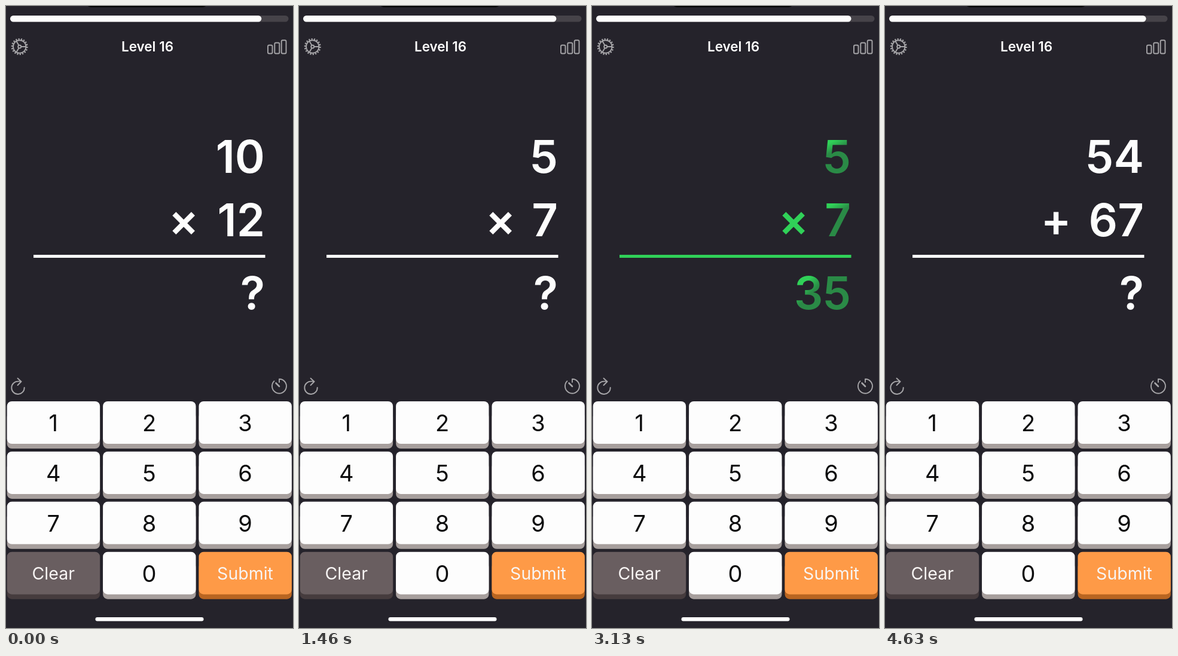
An HTML page that plays this animation: 480 by 1040 pixels, repeating every 5290 ms.

```html
<!DOCTYPE html>
<html lang="en">
<head>
<meta charset="utf-8">
<title>Arithmetic drill</title>
<style>
html, body { margin: 0; width: 100%; height: 100%; overflow: hidden; background: #25232b; }
svg { display: block; width: 480px; height: 1040px; font-family: Inter, Roboto, sans-serif; }
.icon { fill: none; stroke: #a6a5a8; stroke-width: 1.9; stroke-linecap: round; stroke-linejoin: round; }
.title { font-size: 22.5px; font-weight: 600; fill: #fdfdfd; text-anchor: middle; }
.num, .op { font-size: 76px; font-weight: 600; font-feature-settings: "calt" 0; }
.num { text-anchor: end; }
.op { text-anchor: middle; }
.key text { font-size: 38px; text-anchor: middle; fill: #0b0b0c; }
.key .word { font-size: 28.5px; fill: #f8f5f4; }
</style>
</head>
<body>
<svg viewBox="0 0 480 1040">
  <defs id="defs"></defs>
  <rect width="480" height="1040" fill="#25232b"/>
  <path d="M137 0H334Q332 2 326 2H145Q139 2 137 0Z" fill="#000"/>
  <rect x="7" y="16" width="465.500" height="10.500" rx="5.250" fill="#464349"/>
  <rect id="bar" x="7" y="16" width="420" height="10.500" rx="5.250" fill="#fdfdfd"/>
  <text class="title" x="236.500" y="76">Level 16</text>

  <g class="icon">
    <g transform="translate(22.700 68)">
      <circle r="10.700"/>
      <circle r="12.700" stroke-width="2.600" stroke-linecap="butt" pathLength="72" stroke-dasharray="2 2"/>
      <circle r="2.500"/>
      <path d="M2.500 0H10.700M-1.250 2.200L-5.350 9.300M-1.250 -2.200L-5.350 -9.300"/>
    </g>
    <rect x="438" y="65.500" width="7.500" height="14" rx="2"/>
    <rect x="449.300" y="61.500" width="8" height="18" rx="2"/>
    <rect x="460.700" y="57.300" width="7.800" height="22.200" rx="2"/>
    <path d="M30.700 638A10.700 10.700 0 1 1 20 627.600H25.500M19.500 622.500L25.500 628L19.500 634"/>
    <path d="M457 629V623.700A12 12 0 1 1 448.500 627.200"/>
    <path d="M451.500 630.500L457 636" stroke-width="2.600"/>
  </g>

  <text class="num" x="433" y="279"></text>
  <text class="op" y="385"></text>
  <text class="num" x="433" y="385"></text>
  <rect id="rule" x="46" y="416" width="387.500" height="5"/>
  <text class="num" x="433" y="507"></text>

  <g id="pad"></g>
  <rect x="149.500" y="1022" width="181" height="6.500" rx="3.250" fill="#fff"/>
</svg>
<script>
const LOOP = 5290, HOLD = 100, LIFT = 60, TRAVEL = 4;
const ECHO = 80, CHEER = 90, SHINE = 250, NEXT = 330;
const WHITE = '#fdfdfd', GREEN = '#30d158', DIM = '#2a8a46';

const rounds = [
  { a: '10', op: '×', opX: 297, b: '12', presses: [[460, '1'], [740, '2'], [1130, '0']] },
  { a: '5', op: '×', opX: 337, b: '7', presses: [[2670, '3'], [2970, '5']] },
  { a: '44', op: '÷', opX: 306.5, b: '11', presses: [[4210, '4']] },
  { a: '54', op: '+', opX: 286, b: '67', presses: [] }
];
const presses = rounds.flatMap(r => r.presses);
const solvedAt = r => r.presses.length ? r.presses.at(-1)[0] + CHEER : Infinity;
const clamp = v => Math.min(1, Math.max(0, v));

const $ = id => document.getElementById(id);
const nums = [...document.querySelectorAll('.num')];
const op = document.querySelector('.op');
const bar = $('bar'), rule = $('rule');

function add(parent, tag, attrs, text = '') {
  const el = document.createElementNS('http://www.w3.org/2000/svg', tag);
  for (const k in attrs) el.setAttribute(k, attrs[k]);
  el.textContent = text;
  return parent.appendChild(el);
}

// Keypad: a fixed base with a movable face
const faces = {};
['1', '2', '3', '4', '5', '6', '7', '8', '9', 'Clear', '0', 'Submit'].forEach((label, i) => {
  const x = 1.7 + (i % 3) * 160.4, y = 661 + Math.floor(i / 3) * 83.9;
  const word = label.length > 1;
  const [face, base] = label === 'Clear' ? ['#695e60', '#463c3e']
    : label === 'Submit' ? ['#fe9a47', '#b96521'] : [WHITE, '#a79f9d'];
  const key = add($('pad'), 'g', { class: 'key' });
  add(key, 'rect', { x, y: y + 18, width: 155.4, height: 61, rx: 8, fill: base });
  const top = faces[label] = add(key, 'g', {});
  add(top, 'rect', { x, y, width: 155.4, height: 71, rx: 8, fill: face });
  add(top, 'text', { x: x + 77.5, y: y + (word ? 46.5 : 50), class: word ? 'word' : '' }, label);
});

// One diagonal highlight per number
const shines = nums.map((_, i) => {
  const g = add($('defs'), 'linearGradient', { id: 'shine' + i, gradientUnits: 'userSpaceOnUse' });
  [DIM, GREEN, GREEN, DIM].forEach((c, n) =>
    add(g, 'stop', { offset: [0, 0.3, 0.65, 1][n], 'stop-color': c }));
  return g;
});

function moveShine(i, chars, p) {
  const w = 46.5 * chars, h = 90, x0 = 431 - w, y0 = nums[i].getAttribute('y') - 71;
  [[1, p - 0.22], [2, p + 0.22]].forEach(([n, k]) => {
    shines[i].setAttribute('x' + n, x0 + w * k);
    shines[i].setAttribute('y' + n, y0 + h * k);
  });
}

function paint(now) {
  const t = now % LOOP;
  const round = rounds.find(r => t < solvedAt(r) - CHEER + NEXT);
  const typed = round.presses.filter(([at]) => t >= at + ECHO).map(p => p[1]).join('');
  const since = t - solvedAt(round), solved = since >= 0;

  [round.a, round.b, typed || '?'].forEach((s, i) => {
    nums[i].textContent = s;
    nums[i].setAttribute('fill', solved ? `url(#shine${i})` : WHITE);
    if (solved) moveShine(i, s.length, -0.25 + 1.5 * since / SHINE);
  });
  op.textContent = round.op;
  op.setAttribute('x', round.opX);
  for (const el of [op, rule]) el.setAttribute('fill', solved ? GREEN : WHITE);

  const score = rounds.reduce((n, r) => n + clamp((t - solvedAt(r)) / 60), 0);
  bar.setAttribute('width', 420.3 + 3.1 * score);

  for (const label in faces) {
    const hit = presses.find(([at, k]) => k === label && t >= at && t < at + HOLD + LIFT);
    const y = hit ? TRAVEL * (1 - clamp((t - hit[0] - HOLD) / LIFT)) : 0;
    faces[label].setAttribute('transform', `translate(0 ${y})`);
  }
}

const start = performance.now();
function tick() {
  paint(performance.now() - start);
  requestAnimationFrame(tick);
}
tick();
</script>
</body>
</html>
```
